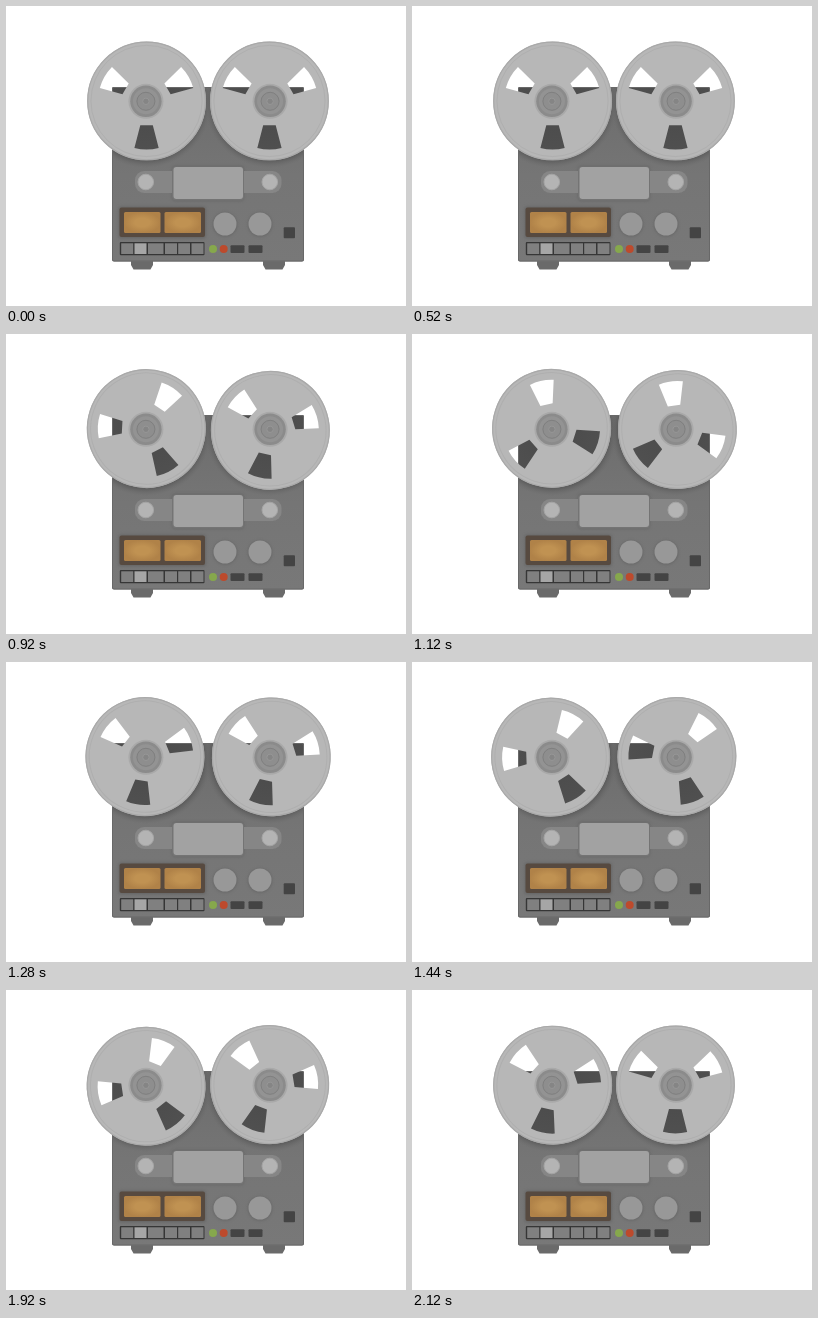
These frames come from a looping animation (400 px wide and 300 px high, 2160 ms). An HTML page:

```html
<!DOCTYPE html>
<html lang="en">
<head>
<meta charset="utf-8">
<title>Tape recorder</title>
<style>
  html, body { margin: 0; width: 100%; height: 100%; overflow: hidden; background: #fff; }
  svg { display: block; width: 100vw; height: 100vh; }
</style>
</head>
<body>
<svg viewBox="0 0 400 300">
  <defs>
    <linearGradient id="panel" x1="0" y1="0" x2="0" y2="1">
      <stop offset="0" stop-color="#6c6c6c"/>
      <stop offset=".5" stop-color="#757575"/>
      <stop offset="1" stop-color="#787878"/>
    </linearGradient>
    <radialGradient id="shade">
      <stop offset="0" stop-color="#4a4a4a"/>
      <stop offset=".76" stop-color="#505050"/>
      <stop offset=".88" stop-color="#5c5c5c"/>
      <stop offset="1" stop-color="#6c6c6c" stop-opacity="0"/>
    </radialGradient>
    <radialGradient id="lamp">
      <stop offset=".4" stop-color="#c09252"/>
      <stop offset="1" stop-color="#b08248"/>
    </radialGradient>
    <filter id="soft" x="-20%" y="-20%" width="140%" height="140%">
      <feGaussianBlur stdDeviation="1.4"/>
    </filter>
    <clipPath id="case"><rect x="106" y="81" width="192" height="174.5" rx="2"/></clipPath>
    <g id="hub">
      <circle r="17.5" fill="#a9a9a9"/>
      <circle r="15.7" fill="#8b8b8b"/>
      <circle r="13" fill="#939393"/>
      <circle r="9" fill="#8e8e8e" stroke="#7f7f7f" stroke-width="1"/>
      <circle r="3.2" fill="#858585" stroke="#979797" stroke-width="1"/>
    </g>
    <path id="foot" d="M-11 0H11V4L8.5 8.5H-8.5L-11 4Z" fill="#6a6a6a"/>
  </defs>

  <use href="#foot" x="136" y="255"/>
  <use href="#foot" x="268" y="255"/>

  <g clip-path="url(#case)">
    <rect x="106" y="81" width="192" height="175" fill="url(#panel)"/>
    <circle cx="140" cy="96" r="66" fill="url(#shade)"/>
    <circle cx="264" cy="96" r="66" fill="url(#shade)"/>
    <rect x="106" y="81" width="192" height="174.5" rx="2" fill="none" stroke="#686868" stroke-width="2"/>
    <g fill="#5c5c5c" opacity=".6" filter="url(#soft)">
      <rect x="166" y="160" width="72" height="35" rx="4"/>
      <rect x="112.500" y="200.500" width="87.500" height="32" rx="3"/>
      <circle cx="219" cy="218.500" r="12"/>
      <circle cx="254" cy="218.500" r="12"/>
    </g>
  </g>

  <rect x="129" y="165" width="146.500" height="22" rx="9" fill="#868686"/>
  <g fill="#b4b4b4" stroke="#a5a5a5">
    <circle cx="139.800" cy="176" r="7.800"/>
    <circle cx="263.800" cy="176" r="7.800"/>
  </g>
  <rect x="166" y="160.500" width="72" height="34" rx="4" fill="#747474"/>
  <rect x="167.500" y="161" width="69.500" height="32" rx="3" fill="#a2a2a2"/>

  <rect x="113.500" y="201.500" width="85.500" height="29.500" rx="2" fill="#574a40"/>
  <g fill="url(#lamp)">
    <rect x="118" y="206" width="36.500" height="21" rx="1.500"/>
    <rect x="158.500" y="206" width="36.500" height="21" rx="1.500"/>
  </g>
  <g fill="#989898">
    <circle cx="219" cy="218" r="11.500"/>
    <circle cx="254" cy="218" r="11.500"/>
  </g>

  <rect x="113.800" y="236" width="84.700" height="13.300" rx="1" fill="#363636"/>
  <g id="keys"></g>
  <circle cx="207" cy="243" r="4" fill="#86a84c"/>
  <circle cx="217.700" cy="243" r="4" fill="#bd4a2c"/>
  <g fill="#444">
    <rect x="224.500" y="239.300" width="14" height="7.700" rx="1"/>
    <rect x="242.500" y="239.300" width="14" height="7.700" rx="1"/>
    <rect x="277.700" y="221.300" width="11.300" height="11" rx="1"/>
  </g>

  <g id="reels"></g>
</svg>
<script>
  const LOOP = 2160, STEP = 40;

  function add(parent, tag, attrs) {
    const el = document.createElementNS("http://www.w3.org/2000/svg", tag);
    for (const name in attrs) el.setAttribute(name, attrs[name]);
    return parent.appendChild(el);
  }

  const keys = document.getElementById("keys");
  [[115.2, 12], [128.5, 12], [142, 15.5], [159, 12], [172.2, 11.8], [185.5, 12]].forEach(([x, width], i) =>
    add(keys, "rect", { x, y: 237.3, width, height: 10.7, fill: i === 1 ? "#a6a6a6" : "#808080" }));

  // Disc with three tapered windows
  function discPath(radius) {
    const inner = 25, outer = 48.5, spread = 14.5;
    const at = (r, deg) => {
      const a = deg * Math.PI / 180;
      return (r * Math.cos(a)).toFixed(2) + " " + (r * Math.sin(a)).toFixed(2);
    };
    let d = `M${radius} 0A${radius} ${radius} 0 1 1 ${-radius} 0A${radius} ${radius} 0 1 1 ${radius} 0Z`;
    for (const mid of [90, 210, 330]) {
      const a = mid - spread, b = mid + spread;
      d += `M${at(inner, a)}L${at(outer, a)}A${outer} ${outer} 0 0 1 ${at(outer, b)}L${at(inner, b)}Z`;
    }
    return d;
  }

  // Turn keys: [time in ms, degrees counter-clockwise]
  const reels = [
    { x: 139.6, y: 95.3, dx: 0.95, dy: -0.35,
      turn: [[0, 0], [560, 0], [920, 27], [1120, 72], [1440, 152], [1760, 227], [2120, 348], [2160, 360]] },
    { x: 264.4, y: 95.3, dx: -0.95, dy: -0.35,
      turn: [[0, 0], [560, 0], [920, 107], [1120, 188], [1440, 259], [1760, 314], [2120, 359.5], [2160, 360]] }
  ];

  const root = document.getElementById("reels");
  for (const reel of reels) {
    reel.spin = add(root, "g", {});
    const disc = add(reel.spin, "g", { transform: `translate(${reel.dx} ${reel.dy})` });
    add(disc, "path", { d: discPath(59.4), fill: "#b7b7b7", "fill-rule": "evenodd" });
    add(disc, "circle", { r: 58.8, fill: "none", stroke: "#a9a9a9", "stroke-width": 1.2 });
    add(disc, "circle", { r: 55.6, fill: "none", stroke: "#afafaf", "stroke-width": 1 });
    add(root, "use", { href: "#hub", x: reel.x + reel.dx / 3, y: reel.y });
  }

  // Smooth monotone curve through the keys
  function curve(pts, t) {
    const slope = i => (pts[i + 1][1] - pts[i][1]) / (pts[i + 1][0] - pts[i][0]);
    const last = pts.length - 2;
    const tangent = i => {
      if (i === 0) return slope(0);
      if (i > last) return slope(last);
      const a = slope(i - 1), b = slope(i);
      return a * b > 0 ? 2 * a * b / (a + b) : 0;
    };
    let i = 0;
    while (i < last && t >= pts[i + 1][0]) i++;
    const span = pts[i + 1][0] - pts[i][0], u = (t - pts[i][0]) / span, v = 1 - u;
    return pts[i][1] * v * v * (1 + 2 * u) + pts[i + 1][1] * u * u * (3 - 2 * u)
      + span * u * v * (tangent(i) * v - tangent(i + 1) * u);
  }

  function draw() {
    const t = Math.floor(performance.now() % LOOP / STEP) * STEP;
    for (const { spin, x, y, turn } of reels)
      spin.setAttribute("transform", `translate(${x} ${y}) rotate(${-curve(turn, t)})`);
    requestAnimationFrame(draw);
  }
  draw();
</script>
</body>
</html>
```
